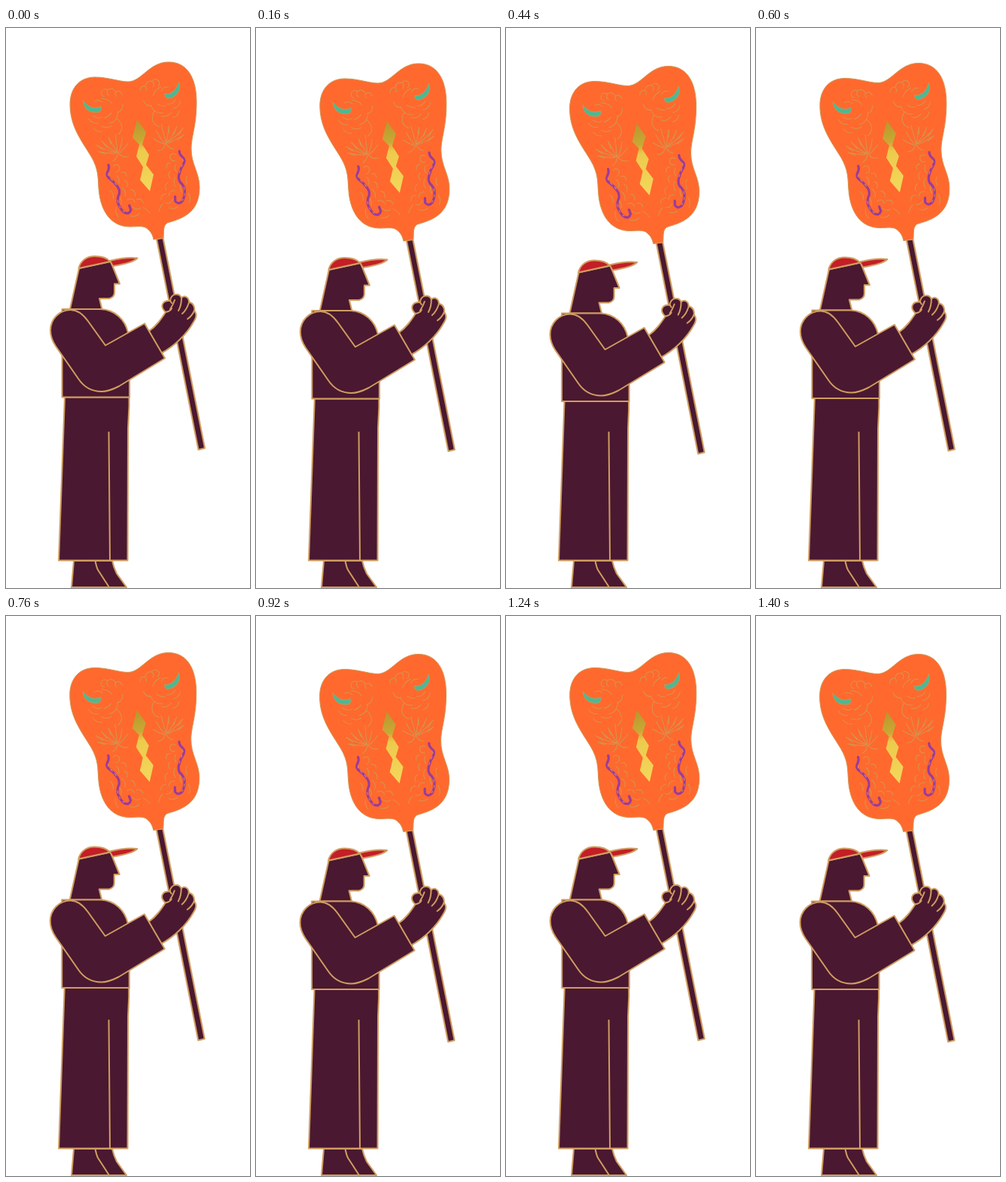
Write an HTML page that moves like this. It is 324 by 741 pixels and loops after 1440 ms.

```html
<!DOCTYPE html>
<html lang="en">
<head>
<meta charset="utf-8">
<title>Lantern bearer</title>
<style>
html, body { margin: 0; width: 100%; height: 100%; overflow: hidden; background: #fff; }
svg { display: block; width: 100vw; height: 100vh; }
.ink { fill: #4a1830; stroke: #cf9d60; stroke-width: 2; stroke-linejoin: round; stroke-linecap: round; }
.line { fill: none; }
.red { fill: #c41e26; }
.fan { fill: #ff692e; stroke: #d39a58; stroke-width: 1; }
.lace { fill: none; stroke: #d4954f; stroke-width: 1; stroke-linecap: round; }
.eye { fill: #4db893; stroke: #d39a58; stroke-width: .6; }
.ribbon { fill: none; stroke: #9b3b9c; stroke-width: 3.2; stroke-linecap: round; stroke-linejoin: round; }
</style>
</head>
<body>
<svg viewBox="0 0 324 741">
  <defs>
    <linearGradient id="gold" gradientUnits="userSpaceOnUse" x1="174" y1="121" x2="191" y2="216">
      <stop offset="0" stop-color="#b8962c"/>
      <stop offset=".3" stop-color="#c9a935"/>
      <stop offset=".42" stop-color="#ecca4c"/>
      <stop offset="1" stop-color="#f3d75c"/>
    </linearGradient>
    <!-- one half of the face, drawn around its axis -->
    <g id="half">
      <path class="eye" d="M65-11C66 2 58 8 46 8Q42 5 43 1C54 4 60-3 65-11Z"/>
      <path class="lace" d="M12-9Q14-16 19-14Q23-12 20-8M20-14Q23-21 29-19Q34-16 30-11M30-19Q36-23 39-17Q40-12 36-11
        M14 4Q16 13 23 13M22 12Q25 25 36 25M40-9Q30-6 28 0M50-7Q43-9 40-4M56 11Q51 17 44 15M62 14Q59 22 51 22
        M41 17Q35 16 31 12M47 27Q40 32 34 29M58 27Q55 34 48 34M26 20Q20 26 21 34M21 34Q23 40 28 42"/>
      <path class="lace" d="M33 66Q32 52 31 40M33 66Q38 52 41 43M34 65Q45 56 51 46M35 65Q48 59 59 50M36 66Q48 63 58 59
        M31 65Q26 57 23 47M30 66Q22 61 17 56M33 66Q35 73 41 75M32 66Q28 74 20 73M41 43L39 53M51 46L45 56M59 50L51 58
        M58 59L49 64M23 47L27 58"/>
      <path class="lace" d="M42 82Q36 78 34 85Q35 91 40 90M33 92Q27 91 27 98M40 95Q36 100 39 105M31 103Q26 106 29 112
        M36 112Q31 118 34 124M25 117Q19 119 21 126M32 129Q25 127 23 134M20 131Q13 130 12 137M27 140Q22 146 17 143
        M13 143Q8 147 6 152M43 121Q38 126 41 133M49 136Q52 143 48 149M32 151Q25 154 20 150M52 113Q48 117 50 124"/>
      <path class="ribbon" d="M48 79Q47 83 51 88Q54 92 50 97Q45 102 43 107Q39 113 41 119Q46 126 45 132Q43 141 39 145Q33 149 30 143L31 137"/>
      <path class="lace" stroke-dasharray="3 5" d="M50 90Q52 94 48 98Q43 105 42 109M45 127Q45 139 39 144"/>
    </g>
  </defs>

  <path class="ink" d="M90 705L87 740H160L147 722Q143 714 141 705Z"/>
  <path class="ink line" d="M118.500 705Q120 713 122 717L137 740"/>
  <path class="ink" id="pants"/>
  <path class="ink line" d="M136.500 535L138 704"/>

  <g id="upper">
    <path class="ink" d="M200 279L255.500 558L264 556L208.500 278Z"/>
    <path class="fan" d="M162 71C150 71 136 65 118 65C98 65 85 79 85 101C85 131 101 150 113 170C123 187 122 198 123 212C125 242 139 263 165 263C175 263 183 261 188 266C193 270 195 275 196 280L209 278C210 270 208 262 214 258C230 253 257 247 257 211C257 191 246 181 246 160C246 143 253 130 253 98C253 65 240 45 216 45C190 45 180 71 162 71Z"/>
    <g transform="translate(168 94.500) rotate(-11)">
      <use href="#half"/>
      <use href="#half" transform="scale(-1 1)"/>
    </g>
    <path fill="url(#gold)" d="M174 121L186 138L181 154L190 168L186 181L196 194L191 216L178 201L182 184L173 170L177 154L168 145Z"/>

    <path class="ink" d="M97 318L85 372H127.500L124 358H137Q144 356 144 350V338.500H151L139 309Z"/>
    <path class="ink red" d="M96.500 318C99 308 107 302 118 302C128 302 134 304 138 309Z"/>
    <path class="ink red" d="M138 308C150 305 165 303 174.500 304.500C170 309 155 313 142 315Z"/>

    <path class="ink" d="M74.500 488.500V372H126C145 373 158 386 162 403L164 466V488.500Z"/>
    <path class="ink" d="M190 401C200 394 206 385 212 376C204 369 207 360 218 361C219 351 230 350 233 357C238 353 243 357 243 363C248 363 251 369 250 374C254 378 253 383 249 389C240 405 224 421 205 431Z"/>
    <path class="ink line" d="M212 376Q218 375 220 371M218 372Q222 366 224 360M233 357Q233 367 229 374M243 363Q240 373 234 378M250 374Q247 381 241 385M218 361L220 364"/>
    <path class="ink" d="M132 420L109 388C101 377 94 373 86 373C70 373 59 386 59 400C59 409 62 415 66 421L96 464C104 476 116 481 127 481C137 481 144 477 150 474L211 437L184 391Z"/>
  </g>
</svg>
<script>
const pants = document.getElementById('pants');
const upper = document.getElementById('upper');
const STEP = 40, CYCLE = 480, DROP = 6;

// The upper body sinks steadily, then snaps back up; the hem stays put.
function draw(ms) {
  const t = Math.floor((ms % CYCLE) / STEP) * STEP;
  const y = DROP * t / CYCLE;
  const x = -0.08 * y;
  upper.setAttribute('transform', `translate(${x} ${y})`);
  pants.setAttribute('d',
    `M${78 + x} ${488.5 + y}L70 704.5H161.500L162 530L${163.5 + x} ${500 + y}V${488.5 + y}Z`);
}

const start = performance.now();
function tick() {
  draw(performance.now() - start);
  requestAnimationFrame(tick);
}
tick();
</script>
</body>
</html>
```
